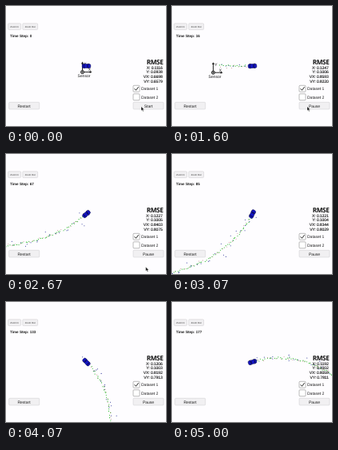
Recreate the animation shown at these times as an HTML page. Size 200 px wide and 150 px high, loop 5070 ms.

```html
<!DOCTYPE html>
<html lang="en">
<head>
<meta charset="utf-8">
<title>Sensor tracking</title>
<style>
  html, body { margin: 0; width: 100%; height: 100%; overflow: hidden; background: #fefdff; }
  svg { display: block; width: 100vw; height: 100vh; }
  text { font: 5px "Liberation Sans", Arial, sans-serif; fill: #1c1c1c; text-rendering: geometricPrecision; }
  .mid { text-anchor: middle; }
  .end { text-anchor: end; letter-spacing: -.1px; fill: #111; stroke: #111; stroke-width: .12; }
  .small { font-size: 2.9px; fill: #333; }
  .step { font-size: 4.6px; font-weight: bold; }
  .title { font: bold 8.2px "Open Sans", "Liberation Sans", sans-serif; font-stretch: 75%; letter-spacing: -.4px; fill: #111; }
  .button { fill: #f1f0f2; stroke: #cacacc; stroke-width: .5; }
  .box { fill: #fff; stroke: #777; stroke-width: .5; }
</style>
</head>
<body>
<svg viewBox="0 0 200 150">
  <g id="world">
    <g stroke="#111" fill="none" stroke-width=".9">
      <path d="M0 0V-11M0 0H10"/>
      <path d="M-1.5 -10.2L0 -13L1.5 -10.2ZM9.2 -1.5L12 0L9.2 1.5Z" fill="#111" stroke="none"/>
      <circle r="2" fill="#fff" stroke-width="1"/>
      <circle r="1" fill="#111" stroke="none"/>
      <g stroke="none">
        <text x="1.7" y="-8.2">Y</text>
        <text x="7.3" y="-1.7">X</text>
        <text x="2" y="6.8" class="mid">Sensor</text>
      </g>
    </g>
    <g id="trail"></g>
  </g>
  <g id="car">
    <path d="M-3.7 -2.6h2M1.7 -2.6h2M-3.7 2.6h2M1.7 2.6h2" stroke="#111" stroke-width=".7"/>
    <rect x="-5.3" y="-2.5" width="10.6" height="5" rx="1.6" fill="#1414be" stroke="#0a0a52" stroke-width=".5"/>
    <path d="M1 -1.8L2.3 -1.5V1.5L1 1.8ZM-3.6 -1.4L-2.6 -1.7V1.7L-3.6 1.4Z" fill="#080a4c"/>
  </g>
  <g id="ui">
    <rect class="button" x="2.6" y="21.8" width="16" height="7.8" rx="1"/>
    <text class="small mid" x="10.6" y="26.8">Zoom In</text>
    <rect class="button" x="20.8" y="21.8" width="18.8" height="7.8" rx="1"/>
    <text class="small mid" x="30.2" y="26.8">Zoom Out</text>
    <text id="step" class="step" x="5" y="38.7"></text>
    <text class="title" x="175.8" y="72.6">RMSE</text>
    <rect class="box" x="159" y="99.3" width="8" height="8" rx="1"/>
    <path d="M160.7 103.3L162.5 105.3L165.6 101.2" fill="none" stroke="#222" stroke-width="1"/>
    <text x="169" y="105">Dataset 1</text>
    <rect class="box" x="159" y="109.8" width="8" height="8" rx="1"/>
    <text x="169" y="115.5">Dataset 2</text>
    <rect class="button" x="3.7" y="120.3" width="38" height="8.7" rx="1"/>
    <text class="mid" x="22.5" y="126.5">Restart</text>
    <rect class="button" x="159" y="120.3" width="38" height="8.7" rx="1"/>
    <text id="run" class="mid" x="178" y="126.5"></text>
  </g>
  <path id="cursor" d="M0 0V5L1.2 4L2.1 6L3 5.6L2.1 3.7H3.7Z" fill="#111" stroke="#fff" stroke-width=".3"/>
</svg>
<script>
const LOOP = 5070, TICK = 200 / 3, PRESSED = 1070;
const LAST = 180, SPEED = 2.75;
const CENTER = { x: 100.5, y: 75 };

// [time in ms, simulation step]
const STEPS = [[1200, 0], [1600, 16], [2200, 46], [3070, 85], [5000, 177]];
// [time in ms, x, y]
const POINTER = [[2070, 169, 125.8], [2200, 174, 135.8], [2600, 174, 135.8], [2800, 176, 152]];
// before the run, once settled, at the end
const ERRORS = {
  X: [.1116, .1247, .1192],
  Y: [.0938, .1006, .1002],
  VX: [.6698, .8593, .8059],
  VY: [.6579, .8220, .7811]
};
const SETTLED = 16, END = 177;

const SVG = "http://www.w3.org/2000/svg";
const $ = id => document.getElementById(id);
const mix = (a, b, u) => a + (b - a) * u;
const clamp = u => Math.max(0, Math.min(1, u));

function add(parent, tag, attrs) {
  const el = document.createElementNS(SVG, tag);
  for (const key in attrs) el.setAttribute(key, attrs[key]);
  parent.append(el);
  return el;
}

function along(keys, at, col = 1) {
  const i = Math.max(1, keys.findIndex(k => k[0] >= at));
  const [a, b] = at > keys[keys.length - 1][0] ? keys.slice(-2) : [keys[i - 1], keys[i]];
  return mix(a[col], b[col], clamp((at - a[0]) / (b[0] - a[0])));
}

let seed = 71;
function random() {
  seed = (seed * 16807) % 2147483647;
  return seed / 2147483647;
}
const noise = sd => (random() + random() + random() - 1.5) * 2 * sd;

// The turn rate follows a sine, so the heading in degrees follows 1 - cos.
const heading = step => 122 * (1 - Math.cos(Math.PI * step / 250));

// Positions are relative to the sensor, y pointing down.
const path = [{ x: 5, y: -7.6 }];
for (let i = 1; i <= LAST; i++) {
  const a = heading(i - .5) * Math.PI / 180, p = path[i - 1];
  path.push({ x: p.x + SPEED * Math.cos(a), y: p.y - SPEED * Math.sin(a) });
}

const dot = (parent, cx, cy, r, fill) => add(parent, "circle", { cx, cy, r, fill });

// Each step leaves one measurement (lidar or radar) and one estimate.
const marks = path.map(({ x, y }, i) => {
  const g = add($("trail"), "g");
  if (i % 2) {
    const range = Math.hypot(x, y) + noise(2.6), angle = Math.atan2(y, x) + noise(.025);
    dot(g, range * Math.cos(angle), range * Math.sin(angle), .52, "#1c2490");
  } else {
    dot(g, x + noise(1.3), y + noise(1.3), .42, "#a03838");
  }
  const drift = 2 * Math.max(0, 1 - i / 14);
  dot(g, x + noise(.6), y + noise(.6) - drift, .6, "#2cba2c");
  return g;
});

const readouts = Object.entries(ERRORS).map(([name, values], i) => ({
  name, values,
  el: add($("ui"), "text", { class: "end", x: 195.6, y: 78.7 + 5.6 * i })
}));

function errorAt([before, settled, end], step) {
  if (step === 0) return before;
  return mix(settled, end, Math.pow(clamp((step - SETTLED) / (END - SETTLED)), .9));
}

const move = (el, x, y, turn = 0) => el.setAttribute("transform", `translate(${x} ${y}) rotate(${turn})`);

function draw(ms) {
  const t = Math.floor(ms / TICK + .1) * TICK;
  const step = Math.round(along(STEPS, t));
  const p = path[step];
  move($("world"), CENTER.x - p.x, CENTER.y - p.y);
  move($("car"), CENTER.x, CENTER.y, -heading(step));
  marks.forEach((m, i) => m.setAttribute("display", i > 0 && i <= step ? "inline" : "none"));
  $("step").textContent = "Time Step: " + step;
  for (const { name, values, el } of readouts) {
    el.textContent = `${name}: ${errorAt(values, step).toFixed(4)}`;
  }
  $("run").textContent = t < PRESSED - TICK / 2 ? "Start" : "Pause";
  move($("cursor"), along(POINTER, t), along(POINTER, t, 2));
}

const start = performance.now();
function frame() {
  draw((performance.now() - start) % LOOP);
  requestAnimationFrame(frame);
}
draw(0);
requestAnimationFrame(frame);
</script>
</body>
</html>
```
